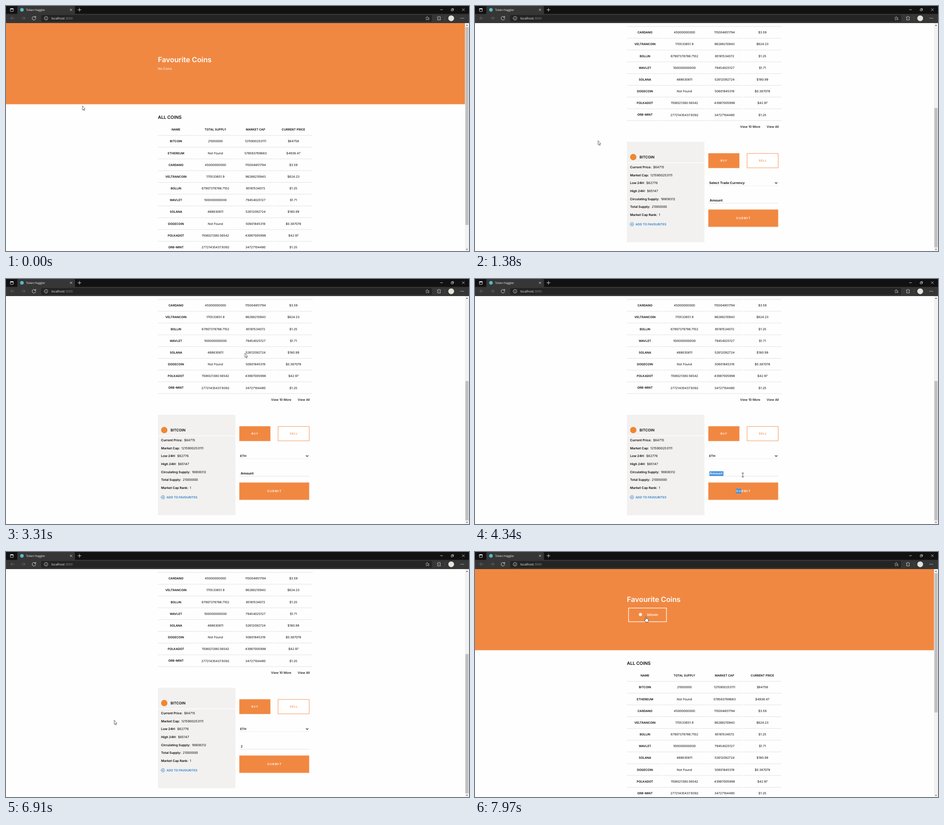
Animation of 1027 by 545 pixels, one loop 8000 ms. Source, as an HTML page:

```html
<!DOCTYPE html>
<html lang="en">
<head>
<meta charset="utf-8">
<title>Coin dashboard</title>
<style>
html, body { margin: 0; width: 100%; height: 100%; overflow: hidden; background: #fefefe; }
svg { display: block; width: 1027px; height: 545px; font-family: Inter, "Open Sans", sans-serif; text-rendering: geometricPrecision; }
.ui { font-family: "Open Sans", "Noto Sans", sans-serif; }
.b { font-weight: 600; }
.m { font-weight: 500; }
.line { fill: none; stroke-linecap: round; stroke-linejoin: round; }

/* 1% = 80 ms */
.move { animation: 8s infinite; }
.step { animation: 8s step-end infinite; }

#page { animation-name: scroll; }
@keyframes scroll {
  0%, 7.3% { transform: translateY(0); animation-timing-function: cubic-bezier(.215, .61, .355, 1); }
  14.5%, 90.75% { transform: translateY(-294.5px); animation-timing-function: cubic-bezier(.215, .61, .355, 1); }
  96.15%, 100% { transform: translateY(0); }
}
#thumb { animation-name: thumb; }
@keyframes thumb {
  0%, 7.3% { transform: translateY(0); animation-timing-function: cubic-bezier(.215, .61, .355, 1); }
  14.5%, 90.75% { transform: translateY(180px); animation-timing-function: cubic-bezier(.215, .61, .355, 1); }
  96.15%, 100% { transform: translateY(0); }
}
#thumb rect { animation-name: shrink; }
@keyframes shrink { 0% { height: 440px; } 4%, 100% { height: 310px; } }

#cursor { animation-name: pointer; }
@keyframes pointer {
  0%, .3% { transform: translate(169.5px, 222px); }
  5.6%, 17.2% { transform: translate(271.5px, 299px); }
  23.5%, 27.3% { transform: translate(600px, 389px); }
  31.5% { transform: translate(568px, 234.5px); animation-timing-function: ease-out; }
  33.4%, 35.9% { transform: translate(550px, 180px); }
  39%, 45.5% { transform: translate(530px, 165px); }
  49.5% { transform: translate(600px, 428px); }
  51.8%, 52.5% { transform: translate(590px, 472px); }
  54.2%, 66.1% { transform: translate(594px, 436px); }
  71%, 80.2% { transform: translate(797px, 437px); }
  83.8%, 84.6% { transform: translate(392px, 482px); }
  86.4%, 94.6% { transform: translate(240px, 374px); }
  99%, 100% { transform: translate(379px, 144px); }
}
#arrow { animation-name: arrow; }
@keyframes arrow {
  0% { opacity: 1; } 49.2% { opacity: 0; } 66.6% { opacity: 1; }
  83.4% { opacity: 0; } 85% { opacity: 1; } 98.3%, 100% { opacity: 0; }
}
#beam { animation-name: beam; }
@keyframes beam { 0% { opacity: 0; } 49.2% { opacity: 1; } 66.6%, 100% { opacity: 0; } }
#hand { animation-name: hand; }
@keyframes hand { 0% { opacity: 0; } 83.4% { opacity: 1; } 85% { opacity: 0; } 98.3%, 100% { opacity: 1; } }

#popup { animation-name: popup; }
@keyframes popup { 0% { opacity: 0; } 25.2% { opacity: 1; } 40.4%, 100% { opacity: 0; } }
#hover { animation-name: hover; }
@keyframes hover {
  0% { opacity: 0; transform: translateY(213px); }
  28.6% { opacity: 1; transform: translateY(213px); }
  29.6% { opacity: 1; transform: translateY(168.2px); }
  30.4% { opacity: 1; transform: translateY(123.3px); }
  31.2% { opacity: 1; transform: translateY(89.7px); }
  32% { opacity: 1; transform: translateY(56.1px); }
  33% { opacity: 1; transform: translateY(11.2px); }
  37.5%, 100% { opacity: 1; transform: translateY(0); }
}
#unpicked { animation-name: unpicked; }
@keyframes unpicked { 0% { opacity: 1; } 40.4%, 100% { opacity: 0; } }
#picked { animation-name: picked; }
@keyframes picked { 0% { opacity: 0; } 40.4%, 100% { opacity: 1; } }
#marked { animation-name: marked; }
@keyframes marked { 0% { opacity: 0; } 51.8% { opacity: 1; } 57%, 100% { opacity: 0; } }
#blank { animation-name: blank; }
@keyframes blank { 0% { opacity: 1; } 62.5%, 100% { opacity: 0; } }
#typed { animation-name: typed; }
@keyframes typed { 0% { opacity: 0; } 62.5%, 100% { opacity: 1; } }
#none { animation-name: none-yet; }
@keyframes none-yet { 0% { opacity: 1; } 84.2%, 100% { opacity: 0; } }
#favs { animation-name: favs; }
@keyframes favs { 0% { opacity: 0; } 84.2%, 100% { opacity: 1; } }
</style>
</head>
<body>
<svg id="stage" viewBox="0 0 1027 545"></svg>
<script>
const ORANGE = '#f18842', INK = '#0a0a0a';

// Text with its capitals centred on y.
const text = (x, y, str, size, cls = '', attrs = '') =>
  `<text x="${x}" y="${(y + size * .363).toFixed(2)}" font-size="${size}" class="${cls}" ${attrs}>${str}</text>`;
const mid = (x, y, str, size, cls, attrs = '') => text(x, y, str, size, cls, `text-anchor="middle" ${attrs}`);
const rect = (x, y, w, h, fill, attrs = '') =>
  `<rect x="${x}" y="${y}" width="${w}" height="${h}" fill="${fill}" ${attrs}/>`;
const line = (d, color, width = 1) => `<path class="line" d="${d}" stroke="${color}" stroke-width="${width}"/>`;
const group = (id, kind, body) => `<g id="${id}" class="${kind}">${body}</g>`;

const columns = [[337, 417, 377], [418, 512, 464.5], [513.5, 594, 553.5], [595.5, 680, 637.5]];
const coins = [
  ['BITCOIN', '21000000', '1215900253111', '$64758'],
  ['ETHEREUM', 'Not Found', '578563769683', '$4936.47'],
  ['CARDANO', '45000000000', '115004851794', '$3.59'],
  ['VELTRANCOIN', '170533651.9', '96288210943', '$624.23'],
  ['BOLLIN', '67907378786.7102', '85161534072', '$1.25'],
  ['WAVLET', '100000000000', '79454025127', '$1.71'],
  ['SOLANA', '488630611', '52612092724', '$180.99'],
  ['DOGECOIN', 'Not Found', '50601845319', '$0.387078'],
  ['POLKADOT', '1108021380.56542', '43987005998', '$42.97'],
  ['ORB-MINT', '27721435437.9392', '34727104490', '$1.25']
];
const facts = [
  ['Current Price', '$64715'], ['Market Cap', '1215900253111'], ['Low 24H', '$62776'],
  ['High 24H', '$65147'], ['Circulating Supply', '18808312'], ['Total Supply', '21000000'],
  ['Market Cap Rank', '1']
];
const currencies = 'ETH LTC BCH BNB EOS XRP XLM LINK DOT YFI USD AED ARS AUD BDT BHD BMD BRL CAD CHF'.split(' ');

function header() {
  const title = y => text(337, y, 'Favourite Coins', 15.8, 'b');
  return `<g fill="#fff">${rect(0, 38, 1018, 180.5, ORANGE)}` +
    group('none', 'step', title(119) + text(337, 139.5, 'No Coins', 7.2)) +
    group('favs', 'step', title(105) +
      rect(340.6, 124.6, 84, 30.5, 'none', 'stroke="#fff" stroke-width="1.3"') +
      '<circle cx="367" cy="139" r="3.6" fill="#fdf0e4"/>' + text(382, 139, 'bitcoin', 7.3, 'b')) + '</g>';
}

function table() {
  const step = 26.17;
  const heads = ['NAME', 'TOTAL SUPPLY', 'MARKET CAP', 'CURRENT PRICE'];
  let out = text(337, 247, 'ALL COINS', 9.9, 'b');
  columns.forEach(([left, right, centre], c) => {
    out += mid(centre, 275, heads[c], 6.5, 'b');
    for (let r = 0; r <= coins.length; r++)
      out += rect(left, 287.4 + r * step, right - left, .8, '#dadada');
    coins.forEach((coin, r) => {
      out += mid(centre, 301 + r * step, coin[c], c ? 6.8 : 6.6, c ? '' : 'b');
    });
  });
  return out + text(588, 563, 'View 10 More', 7, 'm') + text(647, 563, 'View All', 7, 'm');
}

function details() {
  const rows = facts.map(([name, value], i) =>
    text(344, 653 + i * 17.67, `<tspan class="b">${name}:</tspan><tspan dx="3.4">${value}</tspan>`, 7.05)).join('');
  return rect(337, 596.5, 172, 223.5, '#f2f1f0') +
    '<circle cx="351" cy="630.5" r="7" fill="#f0862f"/>' +
    text(365, 630.5, 'BITCOIN', 8.05, 'b') + rect(337, 642.5, 172, 1.2, '#fff') + rows +
    line('M344 780a4 4 0 1 0 8 0a4 4 0 1 0-8 0M346 780h4M348 778v4', '#2a7fc4', .8) +
    text(356, 780, 'ADD TO FAVOURITES', 6.7, 'b', 'fill="#2a7fc4"');
}

function trade() {
  const wide = n => `letter-spacing="${n}"`;
  return rect(517.5, 622, 69, 33, ORANGE) +
    mid(552.2, 638.5, 'BUY', 6, 'b', `fill="#fff" ${wide(.9)}`) +
    rect(603.5, 622.5, 69, 32, '#fff', `stroke="${ORANGE}" stroke-width=".9"`) +
    mid(638.4, 638.5, 'SELL', 6, 'b', `fill="${ORANGE}" ${wide(.9)}`) +
    group('unpicked', 'step', text(519.5, 688, 'Select Trade Currency', 7.3, 'b')) +
    group('picked', 'step', text(519.5, 688, 'ETH', 6.7, 'b')) +
    line('M665.7 687.2l2.3 2.2 2.3-2.2', '#111', 1.2) +
    rect(517.5, 693.8, 155, .7, '#e6e6e6') +
    group('blank', 'step', text(520.5, 727, 'Amount', 7.5, 'b')) +
    group('typed', 'step', text(520.5, 727, '2', 7.3, 'm')) +
    rect(517.5, 732.7, 155, .8, '#d8d8d8') +
    rect(517.5, 747.2, 155, 38.6, ORANGE) +
    group('marked', 'step', rect(520, 722, 31, 10.5, '#3d8fe0') + rect(579, 761, 11.5, 10.5, '#3d8fe0') +
      text(520.5, 727, 'Amount', 7.5, 'b', 'fill="#fff"')) +
    mid(595.6, 766, 'SUBMIT', 6.4, 'b', `fill="#fff" ${wide(1.3)}`);
}

function popup() {
  const rows = currencies.map((code, i) => text(520.5, 166 + i * 11.21, code, 6.6, 'b')).join('');
  return rect(517.5, 160.5, 155.5, 225, '#fff', 'style="filter:drop-shadow(0 1px 1.5px #0007)" stroke="#aaa" stroke-width=".7"') +
    group('hover', 'step', rect(518, 160.9, 145, 11.2, '#cdcdcd')) + rows +
    rect(663, 161, 9.6, 224, '#f1f1f1') + rect(664, 177, 7.6, 66, '#c1c1c1') +
    '<path d="M665.8 167.2h4.4l-2.2-2.4zM665.8 379h4.4l-2.2 2.4z" fill="#444"/>';
}

function scrollbar() {
  return rect(1018, 38, 9, 507, '#f1f1f1') +
    '<path d="M1020.3 44h4.4l-2.2-2.4zM1020.3 540.4h4.4l-2.2 2.4z" fill="#555"/>' +
    group('thumb', 'move', '<rect class="step" x="1019" y="47" width="7" height="310" fill="#c1c1c1"/>');
}

function chrome() {
  const pale = '#e8e8e8', dim = '#727272';
  return rect(0, 0, 1027, 38, '#111') +
    '<path d="M25 18V3q0-3 3-3H150q3 0 3 3V18z" fill="#363636"/>' +
    rect(0, 17.5, 1027, 20.5, '#363636') + rect(78, 20, 867, 15, '#242424', 'rx="2"') +
    rect(9.7, 5.5, 6.6, 6.6, 'none', `rx="1" stroke="${pale}" stroke-width=".9"`) + rect(9.7, 5.2, 6.6, 2.2, pale) +
    '<circle cx="35.3" cy="8.5" r="4" fill="#55b9c9"/>' +
    `<g class="ui" fill="#f2f2f2">${text(44.5, 8.5, 'Token Haggler', 6.4)}` +
    text(100.5, 27.3, 'localhost<tspan fill="#8d8d8d">:3000</tspan>', 7.05) + '</g>' +
    line('M142.3 6.5l4 4m0-4l-4 4M159.4 8.4h7.2m-3.6-3.6v7.2', pale, .9) +
    line('M963.5 8.2h5M1012 5.7l5 5m0-5l-5 5M987.8 7.2h3.6v3.6h-3.6zM989 7v-1.3h3.7v3.7h-1.3', pale, .8) +
    line('M18.5 27h-8m3.5-3.5l-3.5 3.5 3.5 3.5M34.5 27h8m-3.5-3.5l3.5 3.5-3.5 3.5', dim, .9) +
    line('M65.5 25.2a4 4 0 1 0 .5 2.4M65.8 22.7v2.7h-2.7', pale, .9) +
    line('M84.8 27.3a4 4 0 1 0 8 0a4 4 0 1 0-8 0M88.8 27v2.3M88.8 25.2v.1', pale, .8) +
    line('M934.3 23.2l1.1 2.5 2.8.3-2 1.8M932.2 31l.5-2.8-2.1-2 2.6-.4 1.1-2.6M932.2 31l1.8-1M935.3 29.4a1.7 1.7 0 1 0 3.4 0a1.7 1.7 0 1 0-3.4 0', '#bbb', .8) +
    line('M957.3 24.3h2a1.3 1.3 0 0 1 2.6 0h1.8v2.1a1.3 1.3 0 0 0 0 2.6v2h-6.4v-2a1.3 1.3 0 0 0 0-2.6z', pale, .8) +
    rect(973, 22, .6, 11, '#555') + '<circle cx="987.5" cy="27.3" r="6.4" fill="#dfe5dc"/>' +
    [1009, 1012, 1015].map(x => `<circle cx="${x}" cy="27.3" r=".8" fill="${pale}"/>`).join('');
}

function cursor() {
  const skin = 'fill="#fff" stroke="#222" stroke-width=".7" stroke-linejoin="round"';
  return group('arrow', 'step', `<path d="M0 0V9.4L2 7.6 3.4 10.8 4.8 10.2 3.4 7.1H6z" ${skin}/>`) +
    group('beam', 'step', line('M-2-4.3H2M-2 4.3H2M0-4.3V4.3', '#333', .9)) +
    group('hand', 'step', `<path d="M-1 1Q0-.8 1 1V4.3Q2 3.5 2.8 4.6 3.8 4 4.5 5.1 5.8 4.9 5.9 6.2V8.5L4.8 12H-.5L-3.2 7.8Q-3-.2-1 7.4z" ${skin.replace('stroke-width', 'data-w')} stroke-width=".8"/>`.replace('Q-3-.2-1 7.4', 'Q-2.8 5.8-1 7.4').replace(' data-w=".7"', ''));
}

document.getElementById('stage').innerHTML =
  rect(0, 0, 1027, 545, '#fefefe') +
  `<g fill="${INK}">${group('page', 'move', header() + table() + details() + trade())}` +
  group('popup', 'step', popup()) + '</g>' +
  scrollbar() + chrome() + group('cursor', 'move', cursor());
</script>
</body>
</html>
```
